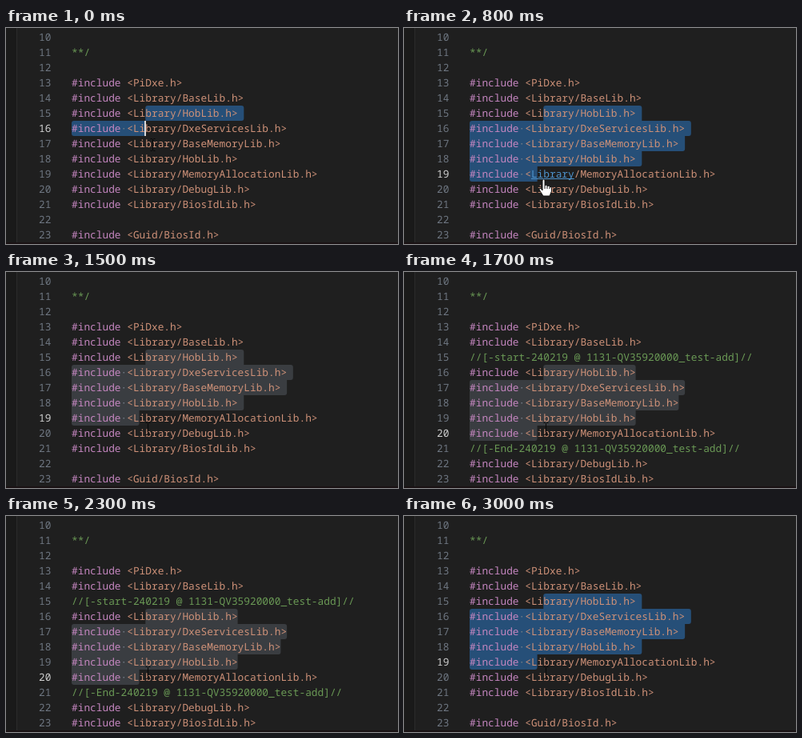
Animation, 490 px wide and 270 px high, one loop 3100 ms. Source, as an HTML page with a canvas:

```html
<!DOCTYPE html>
<html lang="en">
<head>
<meta charset="utf-8">
<style>
  html, body { margin: 0; width: 100%; height: 100%; overflow: hidden; background: #1f1f1f; }
  canvas { display: block; }
</style>
</head>
<body>
<canvas id="stage" width="490" height="270"></canvas>
<script>
const ctx = document.getElementById('stage').getContext('2d');
const LOOP = 3100, STEP = 100;
const CHAR = 7.69, ROW = 19, LEFT = 82, FIRST = 10;
const BLUE = '#264f78', GREY = '#3a3d41';

const lib = name => `#include <Library/${name}.h>`;
const tag = word => `//[-${word}-240219 @ 1131-QV35920000_test-add]//`;
const plain = ['', '**/', '', '#include <PiDxe.h>', lib('BaseLib'), lib('HobLib'),
  lib('DxeServicesLib'), lib('BaseMemoryLib'), lib('HobLib'), lib('MemoryAllocationLib'),
  lib('DebugLib'), lib('BiosIdLib'), '', '#include <Guid/BiosId.h>'];
const tagged = [...plain.slice(0, 5), tag('start'), ...plain.slice(5, 10),
  tag('End'), ...plain.slice(10, 12)];

const colX = col => LEFT + col * CHAR;
const rowY = line => 2 + (line - FIRST) * ROW;
const between = (t, from, to) => t >= from && t < to;

function text(string, x, line, color) {
  ctx.fillStyle = color;
  ctx.fillText(string, x, rowY(line) + 14);
}

function drawSelection(lines, start, end, endCol, color, newline) {
  const spans = [];
  for (let line = start; line <= end; line++) {
    const length = lines[line - FIRST].length + newline;
    spans.push([colX(line === start ? 12 : 0), colX(line === end ? endCol : length)]);
  }
  ctx.fillStyle = color;
  spans.forEach(([left, right], i) => {
    const above = spans[i - 1], below = spans[i + 1];
    const radius = round => round ? 3 : 0;
    ctx.beginPath();
    ctx.roundRect(left, rowY(start + i), right - left, ROW, [
      radius(!above || above[0] > left),
      radius(!above || above[1] < right),
      radius(!below || below[1] < right),
      radius(!below)
    ]);
    ctx.fill();
  });
  for (let line = start + 1; line <= end; line++) {
    ctx.fillStyle = '#707a84';
    ctx.fillRect(colX(8) + 3, rowY(line) + 9, 1.5, 1.5);
  }
}

function drawCode(lines, isActive) {
  lines.forEach((code, i) => {
    const line = FIRST + i;
    text(String(line), 41, line, isActive(line) ? '#d0d0d0' : '#6e7681');
    if (code.startsWith('#')) {
      text('#include', LEFT, line, '#c586c0');
      text(code.slice(9), colX(9), line, '#ce9178');
    } else {
      text(code, LEFT, line, '#6a9955');
    }
  });
}

function drawLink() {
  const x = colX(10), y = rowY(19);
  ctx.fillStyle = '#1f1f1f';
  ctx.fillRect(colX(11), y, 6 * CHAR, ROW);
  ctx.fillStyle = BLUE;
  ctx.fillRect(x, y, CHAR, ROW);
  text('Library', x, 19, '#4e94ce');
  ctx.fillRect(x, y + 15, 7 * CHAR, 1);
}

function drawBeam(x, y) {
  ctx.strokeStyle = '#080808';
  ctx.lineWidth = 1;
  ctx.stroke(new Path2D(`M${x - 3} ${y - 7.5}h2l1 1l1-1h2M${x} ${y - 7}v14M${x - 3} ${y + 7.5}h2l1-1l1 1h2`));
}

function drawHand(x, y) {
  ctx.save();
  ctx.translate(x, y);
  const hand = new Path2D('M-2 0Q0-2 1 0V7Q3 5.5 4 7.5Q6 6.5 7 8.5Q9.5 8 9.5 10V14L7 20H-1L-6 12Q-6 9.5-4 10.5L-2 13Z');
  ctx.fillStyle = '#fff';
  ctx.fill(hand);
  ctx.strokeStyle = '#111';
  ctx.lineWidth = 1;
  ctx.stroke(hand);
  ctx.stroke(new Path2D('M1 7v4M4 8v3M7 9v2'));
  ctx.restore();
}

function draw(now) {
  const t = Math.floor(now % LOOP / STEP) * STEP;
  const inserted = between(t, 1600, 2400);
  const lines = inserted ? tagged : plain;
  const shift = inserted ? 1 : 0;
  const end = (t < 100 ? 16 : t < 200 ? 17 : t < 400 ? 18 : 19) + shift;
  const endCol = t < 300 ? 12 : 11;
  const unfocused = between(t, 1100, 2400);
  const settling = between(t, 2400, 2800);

  ctx.fillStyle = '#1f1f1f';
  ctx.fillRect(0, 0, 490, 270);
  ctx.fillStyle = '#1a1a1a';
  ctx.fillRect(0, 0, 13, 270);
  ctx.fillStyle = '#2b2b2b';
  ctx.fillRect(13, 0, 1, 270);

  ctx.font = '12.82px "Noto Sans Mono", monospace';
  ctx.textRendering = 'geometricPrecision';
  const color = unfocused ? GREY : settling ? '#21426a' : BLUE;
  drawSelection(lines, 15 + shift, end, endCol, color, inserted ? 0 : 1);
  drawCode(lines, line => line === end || settling && line === 20);

  const overLink = between(t, 700, 1100);
  if (overLink) drawLink();
  if (t < 700 || settling) {
    ctx.fillStyle = '#d8d8d8';
    ctx.fillRect(Math.round(colX(endCol)) - 1, rowY(end), 2, ROW);
  }

  const move = Math.min(t / 500, 1);
  if (overLink) drawHand(175, 190);
  else drawBeam(183.5 - 6 * move, 146 + 50 * move);

  ctx.fillStyle = '#1a1214';
  ctx.fillRect(0, 268, 490, 2);
}

function tick() {
  draw(performance.now());
  requestAnimationFrame(tick);
}
tick();
</script>
</body>
</html>
```
